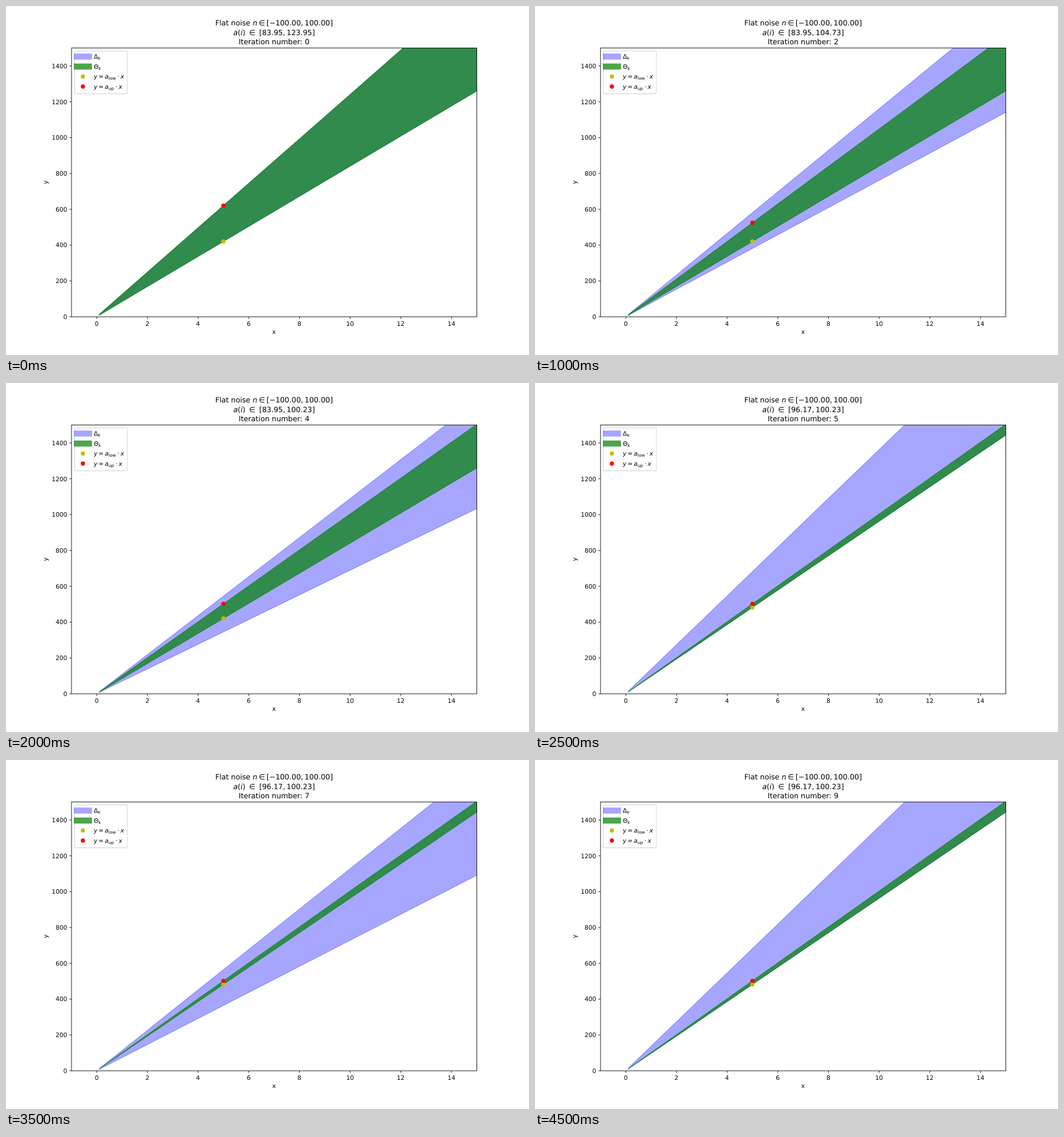
Write an HTML page that moves like this. It is 917 px wide and 611 px high and loops after 5000 ms.

```html
<!DOCTYPE html>
<html lang="en">
<head>
<meta charset="utf-8">
<title>Flat noise</title>
<style>
  html, body { margin: 0; width: 100%; height: 100%; overflow: hidden; background: #fff; }
  svg { display: block; width: 917px; height: 611px; }
  text { font-family: "DejaVu Sans", sans-serif; font-size: 10.61px; white-space: pre; text-rendering: geometricPrecision; }
  .title { font-size: 12.74px; text-anchor: middle; }
  .mid { text-anchor: middle; }
  .end { text-anchor: end; }
  .it { font-style: italic; }
  .sub { font-size: 7.43px; }
  .fan { stroke-width: 1.06; }
  .blue { fill: #00f; stroke: #00f; opacity: 1; fill-opacity: .35; stroke-opacity: .35; }
  .green { fill: #008000; stroke: #008000; fill-opacity: .7; stroke-opacity: .7; }
  .low { fill: #bfbf00; }
  .up { fill: #f00; }
  .axis { fill: none; stroke: #000; stroke-width: .9; }
</style>
</head>
<body>
<svg viewBox="0 0 917 611">
  <clipPath id="area"><rect x="114.8" y="73.5" width="710.7" height="470.6"/></clipPath>
  <text class="title" x="470" y="34">Flat noise <tspan class="it">n</tspan><tspan dx=".2em">∈</tspan><tspan dx=".2em">[−100.00,</tspan><tspan dx=".2em">100.00]</tspan></text>
  <text class="title" x="470" y="50.7"><tspan class="it">a</tspan>(<tspan class="it">i</tspan>) <tspan dx=".2em">∈</tspan><tspan dx=".2em"> [</tspan><tspan id="lowText"></tspan>,<tspan id="upText" dx=".2em"></tspan>]</text>
  <text class="title" x="470" y="67" id="iter"></text>

  <g clip-path="url(#area)">
    <path id="delta" class="fan blue"/>
    <path id="theta" class="fan green"/>
  </g>
  <circle id="lowDot" class="low" r="3.7"/>
  <circle id="upDot" class="up" r="3.7"/>

  <rect class="axis" x="114.9" y="73.5" width="710.6" height="470.6"/>
  <path id="ticks" class="axis"/>
  <g id="labels"></g>
  <text class="mid" x="470" y="574">x</text>
  <text class="mid" transform="translate(73.2 308.6) rotate(-90)">y</text>

  <rect x="120.2" y="78.8" width="92.6" height="74.8" rx="2.1" fill="#fff" fill-opacity=".8" stroke="#ccc" stroke-opacity=".8" stroke-width="1.06"/>
  <rect x="119" y="83.2" width="31.8" height="10.6" fill="#00f" fill-opacity=".35"/>
  <rect x="119" y="100.7" width="31.8" height="10.6" fill="#008000" fill-opacity=".7"/>
  <circle class="low" cx="134.8" cy="123.4" r="3.7"/>
  <circle class="up" cx="134.8" cy="141" r="3.7"/>
  <text x="153.9" y="92.3">Δ<tspan class="it sub" dy="1.7">k</tspan></text>
  <text x="153.9" y="109.8">Θ<tspan class="it sub" dy="1.7">k</tspan></text>
  <g id="formulas"></g>
</svg>
<script>
const $ = id => document.getElementById(id);
const X = x => 159.04 + 44.42 * x;
const Y = y => 543.8 - 0.31365 * y;
const STEP = 500, BAND = 40;

// Lower slope of the measured band at each iteration; the band is 40 wide.
const bandLow = [83.95, 64.73, 76, 60.23, 68.85, 96.17, 84, 72.67, 88, 96.17];
const lowAt = k => k < 5 ? 83.95 : 96.17;
const upAt = k => k < 1 ? 123.95 : k < 3 ? 104.73 : 100.23;

function fan(low, up) {
  const p = (x, a) => X(x).toFixed(2) + " " + Y(a * x).toFixed(2);
  return `M${p(.1, low)}L${p(20, low)}L${p(20, up)}L${p(.1, up)}Z`;
}

function buildAxes() {
  let ticks = "", labels = "";
  for (let x = 0; x <= 14; x += 2) {
    ticks += `M${X(x) + .2} 544.1v3.7`;
    labels += `<text class="mid" x="${X(x)}" y="559.5">${x}</text>`;
  }
  for (let y = 0; y <= 1400; y += 200) {
    ticks += `M114.9 ${Y(y) + .3}h-3.7`;
    labels += `<text class="end" x="107.3" y="${Y(y) + 4.1}">${y}</text>`;
  }
  $("ticks").setAttribute("d", ticks);
  $("labels").innerHTML = labels;
}

const formula = (name, y) =>
  `<text x="153.9" y="${y}"><tspan class="it">y</tspan><tspan dx=".2em">=</tspan>` +
  `<tspan class="it" dx=".2em">a</tspan><tspan class="sub" dy="1.7">${name}</tspan>` +
  `<tspan dx="2.7" dy="-1.7">⋅</tspan><tspan class="it" dx=".2em">x</tspan></text>`;

function placeDot(id, slope) {
  $(id).setAttribute("cx", X(5));
  $(id).setAttribute("cy", Y(5 * slope));
}

function draw(k) {
  const low = lowAt(k), up = upAt(k), band = bandLow[k];
  $("delta").setAttribute("d", fan(band, band + BAND));
  $("theta").setAttribute("d", fan(low, up));
  placeDot("lowDot", low);
  placeDot("upDot", up);
  $("lowText").textContent = low.toFixed(2);
  $("upText").textContent = up.toFixed(2);
  $("iter").textContent = "Iteration number: " + k;
}

buildAxes();
$("formulas").innerHTML = formula("low", 127.2) + formula("up", 144.8);

const start = performance.now();
let shown = -1;
function tick() {
  const k = Math.floor((performance.now() - start) / STEP) % bandLow.length;
  if (k !== shown) draw(shown = k);
  requestAnimationFrame(tick);
}
tick();
</script>
</body>
</html>
```
